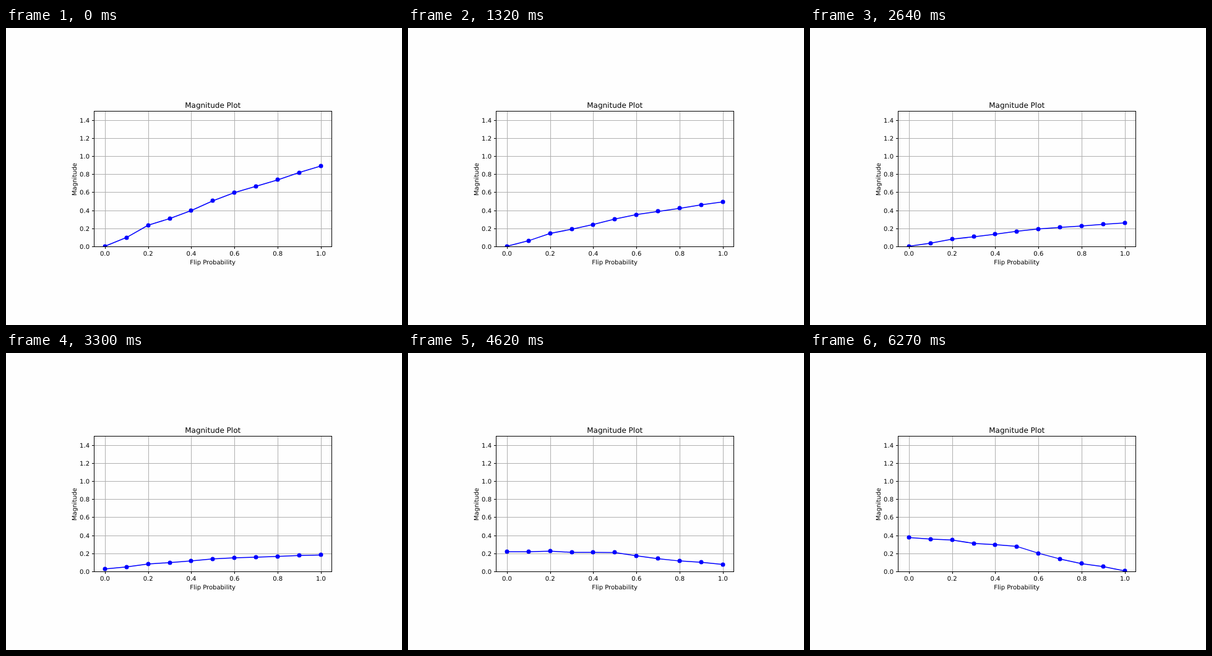
These frames come from a looping animation (640x480 px, 6600 ms). An HTML page:

```html
<!DOCTYPE html>
<html lang="en">
<head>
<meta charset="utf-8">
<title>Magnitude Plot</title>
<style>
  html, body { margin: 0; width: 100%; height: 100%; overflow: hidden; background: #fefefe; }
  svg { display: block; width: 640px; height: 480px; }
  text { font: 10px "DejaVu Sans", sans-serif; text-anchor: middle; text-rendering: geometricPrecision; }
  .title { font-size: 12px; }
  .end { text-anchor: end; }
  .grid { stroke: #b0b0b0; }
  .axis { fill: none; stroke: #000; }
  #line { fill: none; stroke: #00f; stroke-width: 1.5; stroke-linejoin: round; }
  circle { fill: #00f; }
</style>
</head>
<body>
<svg viewBox="0 0 640 480">
  <clipPath id="plot"><rect x="142" y="134" width="384" height="219"/></clipPath>
  <g id="grid"></g>
  <g clip-path="url(#plot)">
    <polyline id="line"/>
    <g id="dots"></g>
  </g>
  <g id="ticks"></g>
  <rect class="axis" x="142.5" y="134.5" width="384" height="219"/>
  <text class="title" x="334.2" y="129">Magnitude Plot</text>
  <text x="334.2" y="382">Flip Probability</text>
  <text transform="translate(114 244.6) rotate(-90)">Magnitude</text>
</svg>
<script>
const STEP = 330, STEPS = 20;
const LEFT = 142, TOP = 134, RIGHT = 526, BOTTOM = 353;
const xAt = v => 159.855 + v * 349.09;
const yAt = v => 352.8 - v * 145.6;
const snap = p => Math.round(p) + 0.5;
const byId = id => document.getElementById(id);

function add(parent, tag, attrs, text = "") {
  const el = document.createElementNS("http://www.w3.org/2000/svg", tag);
  for (const key in attrs) el.setAttribute(key, attrs[key]);
  el.textContent = text;
  return byId(parent).appendChild(el);
}
const segment = (parent, cls, x1, y1, x2, y2) =>
  add(parent, "line", { class: cls, x1, y1, x2, y2 });

for (let i = 0; i <= 5; i++) {
  const x = snap(xAt(i / 5));
  segment("grid", "grid", x, TOP, x, BOTTOM);
  segment("ticks", "axis", x, BOTTOM, x, BOTTOM + 4);
  add("ticks", "text", { x: xAt(i / 5), y: 368 }, (i / 5).toFixed(1));
}
for (let i = 0; i <= 7; i++) {
  const y = snap(yAt(i / 5));
  segment("grid", "grid", LEFT, y, RIGHT, y);
  segment("ticks", "axis", LEFT - 3, y, LEFT, y);
  add("ticks", "text", { class: "end", x: 135, y: Math.round(y + 3.4) }, (i / 5).toFixed(1));
}

// The curve fades from a rising profile into a falling one
const rising = [0, .098, .234, .308, .397, .505, .596, .666, .737, .819, .892];
const falling = [.374, .357, .345, .308, .293, .273, .197, .133, .081, .048, 0];

function magnitudes(step) {
  const decay = 1.08 * Math.exp(-0.1338 * step) - 0.08;
  const growth = Math.max(0, (step - 9.8) / 9.2) ** 0.7;
  const bulge = 0.096 * decay * (1 - decay);
  return rising.map((r, i) =>
    decay * r + growth * falling[i] + bulge * Math.sin(Math.PI * i / 10));
}

const xs = rising.map((_, i) => xAt(i / 10));
const dots = xs.map(x => add("dots", "circle", { cx: Math.round(x), r: 3.5 }));
const start = performance.now();

function draw() {
  const step = Math.floor((performance.now() - start) / STEP) % STEPS;
  const ys = magnitudes(step).map(yAt);
  byId("line").setAttribute("points", xs.map((x, i) => `${x},${ys[i]}`).join(" "));
  dots.forEach((dot, i) => dot.setAttribute("cy", Math.round(ys[i])));
  requestAnimationFrame(draw);
}
draw();
</script>
</body>
</html>
```
